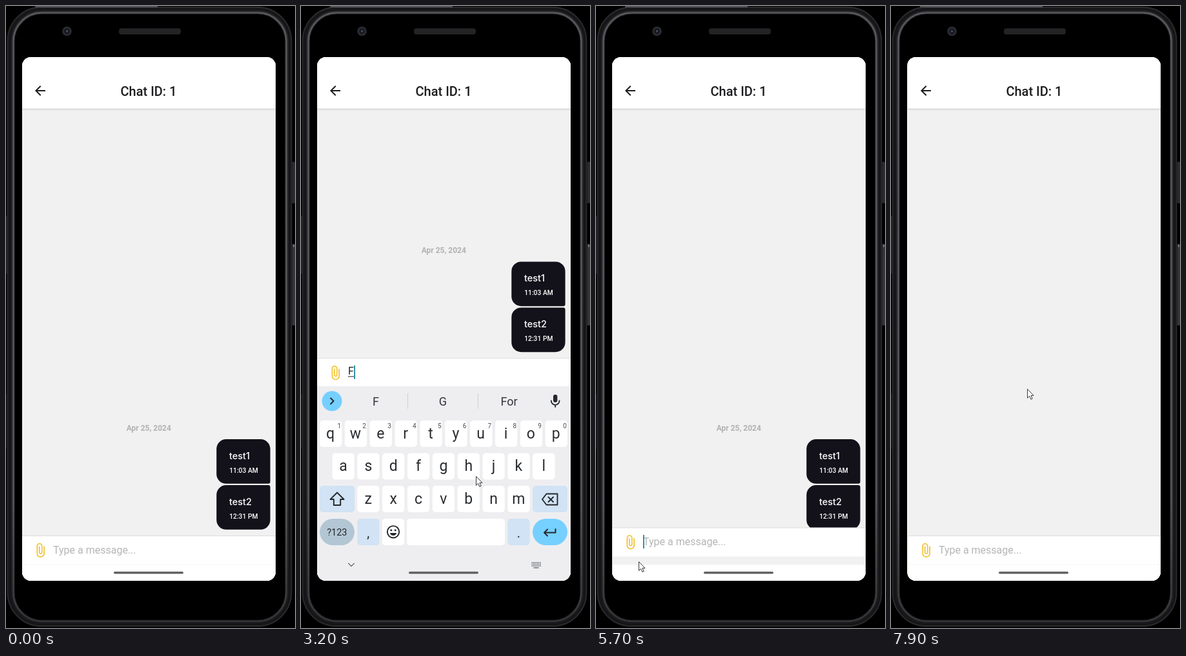
These frames come from a looping animation (448 by 962 pixels, 8000 ms). An HTML page:

```html
<!DOCTYPE html>
<html lang="en">
<head>
<meta charset="utf-8">
<title>Chat demo</title>
<style>
html, body { margin: 0; width: 100%; height: 100%; overflow: hidden; background: #000; }
svg { display: block; width: 100vw; height: 100vh; }
text { font-family: Roboto, "Noto Sans", sans-serif; }
.soft { font-family: Inter, "Open Sans", sans-serif; }
.mid { text-anchor: middle; }
.end { text-anchor: end; }
.line { fill: none; stroke: #25282b; stroke-width: 1.9; }
</style>
</head>
<body>
<svg id="stage" viewBox="0 0 448 962" xmlns="http://www.w3.org/2000/svg"></svg>
<script>
const LOOP = 8000, STEP = 100;
const YELLOW = '#f2c12e', KEY = '#d1e3f4', PRESSED = '#b3c6d4', BLUE = '#75d0ff';

const rect = (x, y, w, h, fill, r = 0, more = '') =>
  `<rect x="${x}" y="${y}" width="${w}" height="${h}" rx="${r}" fill="${fill}" ${more}/>`;
const ring = (x, y, w, h, r, stroke, width) =>
  rect(x, y, w, h, 'none', r, `stroke="${stroke}" stroke-width="${width}"`);
const text = (s, x, y, size, fill, cls = '', weight = 400, more = '') =>
  `<text x="${x}" y="${y}" font-size="${size}" fill="${fill}" class="${cls}" font-weight="${weight}" ${more}>${s}</text>`;
const path = (d, fill, more = '') => `<path d="${d}" fill="${fill}" ${more}/>`;
const stroke = (d, color, width = 1.9) =>
  path(d, 'none', `stroke="${color}" stroke-width="${width}" stroke-linecap="round" stroke-linejoin="round"`);

function phone() {
  return rect(0, 0, 448, 962, '#000') +
    rect(0, 325, 2, 89, '#252527') + rect(0, 600, 1, 85, '#19191b') +
    rect(443, 241, 5, 64, '#2b2b2d', 1) + rect(443, 368, 5, 126, '#343437', 1) +
    rect(445, 369, 2, 4, '#77777a', 1) +
    rect(1.5, 1.5, 442, 958, '#000', 53) +
    ring(6.5, 5.5, 432, 950, 49, '#161618', 9) +
    ring(2.5, 2, 440, 957, 52, '#2c2c2f', 1.8) +
    ring(11, 10, 424, 942, 45, 'url(#rim)', 5) +
    ring(11.5, 10.5, 423, 941, 44, 'url(#rimLight)', 2) +
    path('M45 1H235', 'none', 'stroke="#6b6b70" stroke-width="1.5"') +
    '<circle cx="94.5" cy="39" r="7.3" fill="#292b30"/><circle cx="94.5" cy="39" r="4.2" fill="#14171d"/><circle cx="94.5" cy="39" r="1.7" fill="#454d5d"/>' +
    rect(175, 34.5, 96, 9.5, '#232325', 4);
}

// Corner radii run clockwise from the top left.
function bubble(y, tr, br, message, time) {
  const l = 326.3, r = 409.6, b = y + 68.8, c = 15;
  const arc = (size, x, y) => `A${size} ${size} 0 0 1 ${x} ${y}`;
  return path(`M${l + c} ${y}H${r - tr}${arc(tr, r, y + tr)}V${b - br}${arc(br, r - br, b)}H${l + c}${arc(c, l, b - c)}V${y + c}${arc(c, l + c, y)}Z`, '#13121a') +
    text(message, 346, y + 31, 14.5, '#fff', 'soft', 500) +
    text(time, 346.2, y + 51.6, 10.3, '#fff', '', 500);
}

function chatScreen() {
  const clip = 'M16.5 6v11.5c0 2.21-1.79 4-4 4s-4-1.79-4-4V5c0-1.38 1.12-2.5 2.5-2.5s2.5 1.12 2.5 2.5v10.5c0 .55-.45 1-1 1s-1-.45-1-1V6H10v9.5c0 1.38 1.12 2.5 2.5 2.5s2.5-1.12 2.5-2.5V5c0-2.21-1.79-4-4-4S7 2.79 7 5v12.5c0 3.04 2.46 5.5 5.5 5.5s5.5-2.46 5.5-5.5V6h-1.5z';
  return rect(25, 79, 393, 810, '#f1f1f1') +
    `<g id="thread">${text('Apr 25, 2024', 221.3, 656.8, 12, '#b2b2b2', 'mid', 700)}` +
    bubble(670, 15, 3, 'test1', '11:03 AM') + bubble(741, 3, 15, 'test2', '12:31 PM') + '</g>' +
    rect(25, 79, 393, 79.5, '#fff', 0, 'filter="url(#shade)"') +
    path('M20 11H7.83l5.59-5.59L12 4l-8 8 8 8 1.41-1.41L7.83 13H20v-2z', '#1c1c1e', 'transform="translate(41 119)"') +
    text('Chat ID: 1', 221, 139, 20, '#1c1c1e', 'mid', 500) +
    '<g id="bar">' + rect(25, 819.5, 393, 350, '#f1f1f1') + rect(25, 819.5, 393, 44.5, '#fff') +
    rect(25, 819, 393, 1, '#dcdcdc') +
    path(clip, YELLOW, 'transform="translate(39.6 829.8) scale(1.13 1)"') +
    text('Type a message...', 73, 847, 16, '#b5b5b5', '', 400, 'id="hint"') +
    `<g id="typed">${text('F', 73, 845, 16, '#222')}${rect(73, 847.2, 9, 1, '#222')}</g>` +
    rect(73, 830.5, 1.8, 21, '#21859b', 0, 'id="caret"') +
    path('M2.01 21L23 12 2.01 3 2 10l15 2-15 2z', '#f5bf1b', 'id="send" transform="translate(372.2 828.8) scale(1.13)"') +
    '</g>' + rect(25, 864, 393, 25, '#fff') + rect(25, 863.5, 393, 1, '#f6f6f6') +
    keyboard();
}

function keyboard() {
  const pitch = 38.85;
  let s = rect(25, 588, 393, 301, '#eeeef1') +
    `<circle cx="48" cy="611" r="15.5" fill="${BLUE}"/>` + stroke('M46 606.5l4.5 4.5-4.5 4.5', '#25282b', 2);
  s += '<g id="words">' + [['F', 116], ['G', 220], ['For', 322.5]].map(([w, x]) => text(w, x, 618, 18, '#333639', 'mid')).join('') +
    rect(165, 599, 1, 24, '#cfcfd3') + rect(274, 599, 1, 24, '#cfcfd3') + '</g>';
  s += rect(391, 601, 6.4, 12, '#25282b', 3.2) + stroke('M387.8 610.5a6.4 6.4 0 0 0 12.8 0M394.2 617v3', '#25282b');
  [['qwertyuiop', 29, 641], ['asdfghjkl', 48.4, 691.5], ['zxcvbnm', 87.2, 742]].forEach(([row, x0, y], r) => {
    [...row].forEach((c, i) => {
      const x = x0 + i * pitch;
      s += rect(x, y, 34.3, 41, '#fff', 5) +
        text(c, x + (r ? 17.1 : 16.6), y + 27.8, 23, '#2a2d30', 'mid letter');
      if (!r) s += text((i + 1) % 10, x + 30.3, y + 11.5, 10, '#4a4d50', 'mid');
    });
  });
  s += rect(29, 742, 54, 41, KEY, 5) +
    path('M56 752.5l10.5 10.5h-5.3v9h-10.4v-9h-5.3z', 'none', 'id="shift" stroke="#25282b" stroke-width="1.9" stroke-linejoin="round"') +
    rect(359, 742, 54, 41, KEY, 5, 'id="erase"') +
    stroke('M380.5 754.5h17v17h-17l-6.5-8.5zM383.5 759.5l7.5 7.5m0-7.5l-7.5 7.5', '#25282b') +
    rect(29, 793, 54, 41, PRESSED, 20.5) + text('?123', 55.8, 819, 14.5, '#25282b', 'mid') +
    rect(87.2, 793, 34.3, 41, KEY, 5) + text(',', 104.3, 822, 20, '#25282b', 'mid') +
    rect(126, 793, 34.3, 41, '#fff', 5) +
    '<circle class="line" cx="143" cy="813.3" r="9.2"/><circle cx="139.8" cy="810.8" r="1.5" fill="#25282b"/><circle cx="146.2" cy="810.8" r="1.5" fill="#25282b"/>' +
    path('M137.8 815h10.4a5.4 5.4 0 0 1-10.4 0z', '#25282b') +
    rect(164, 793, 152, 41, '#fff', 5) +
    rect(320.3, 793, 34.3, 41, KEY, 5) + text('.', 337.5, 822, 20, '#25282b', 'mid') +
    rect(359, 793, 54, 41, BLUE, 20.5) +
    stroke('M394.5 809v5.5h-17M382 809.5l-5 5 5 5', '#25282b', 2) +
    stroke('M73.5 862l4.5 4.5 4.5-4.5', '#6b6e72', 1.3);
  for (let i = 0; i < 18; i++) s += rect(357.5 + i % 6 * 2.5, 860 + Math.floor(i / 6) * 2.6, 1.7, 1.7, '#777a7e');
  s += rect(360.5, 868, 8, 1.6, '#777a7e');
  return `<g id="keys">${s}</g>`;
}

function row(y, id, last, date) {
  return `<g transform="translate(0 ${y})"><circle cx="64" cy="0" r="20" fill="#999"/>` +
    path('M64-13.5c-6 0-9.2 4.2-9.2 9.5 0 4.4 1.8 7.4 4.2 9.5-.3 3-1.6 3.7-8 6.5a18 18 0 0 0 26 0c-6.4-2.8-7.7-3.5-8-6.5 2.4-2.1 4.2-5.1 4.2-9.5 0-5.3-3.2-9.5-9.2-9.5z', '#fff') +
    text('Receiver id: ' + id, 94.5, -3, 14.5, '#2b2b2b', 'soft') +
    text(last, 94.5, 15.5, 12, '#444', 'soft') +
    text(date, 397.7, -4.2, 11.8, '#444', 'soft end') +
    rect(25, 41, 393, 1, '#eee') + '</g>';
}

function listScreen() {
  const gray = '#c9c9c9';
  const tab = (s, x, color) => text(s, x, 862, 10.8, color, 'soft mid', 500);
  return rect(25, 79, 393, 810, '#fff') +
    rect(25, 159, 393, 48.5, '#fff', 0, 'filter="url(#shade)"') +
    rect(25, 79, 393, 79.5, '#fff', 0, 'filter="url(#shade)"') +
    text('Messages', 221, 139, 20, '#1c1c1e', 'mid', 500) +
    text('All', 89.5, 190, 17, '#d0d0d0', 'soft mid', 500) +
    text('Sender', 220.7, 190, 17, '#2b2b2b', 'soft mid') +
    text('Expeditor', 352, 190, 17, '#d0d0d0', 'soft mid', 500) +
    rect(155, 206, 132, 2.6, YELLOW) +
    row(247, 453, 'O', '3/28/2024') + row(328.5, 1, 'test2', '4/25/2024') +
    rect(25, 818, 393, 2, '#f1f1f1') +
    ring(81.8, 828, 16.6, 20, 3, gray, 2) + stroke('M86 833.5h8.4M86 838h8.4M86 842.5h5', gray, 1.8) +
    stroke('M214.5 829.5h14a2.5 2.5 0 0 1 2.5 2.5v9a2.5 2.5 0 0 1-2.5 2.5h-4l-3 3.5-3-3.5h-4a2.5 2.5 0 0 1-2.5-2.5v-9a2.5 2.5 0 0 1 2.5-2.5zM217 834.5h9M217 838.8h6', YELLOW, 2) +
    `<circle cx="352" cy="832.8" r="4.4" fill="none" stroke="${gray}" stroke-width="2"/>` +
    stroke('M343.8 847.5v-1.5a4.5 4.5 0 0 1 4.5-4.5h7.4a4.5 4.5 0 0 1 4.5 4.5v1.5z', gray, 2) +
    tab('Orders', 90.3, gray) + tab('Messages', 221.5, YELLOW) + tab('Account', 352.3, gray);
}

const fade = (id, top, bottom) =>
  `<linearGradient id="${id}" x1="0" y1="0" x2="0" y2="1"><stop offset="0" stop-color="${top}"/><stop offset=".8" stop-color="${top}"/><stop offset="1" stop-color="${bottom}"/></linearGradient>`;

document.getElementById('stage').innerHTML =
  `<defs>${fade('rim', '#2f2f32', '#1d1d1f')}${fade('rimLight', '#5c5c61', '#38383b')}
  <clipPath id="screen">${rect(25, 79, 393, 810, '#fff', 14)}</clipPath>
  <filter id="shade" x="-5%" y="-10%" width="110%" height="130%"><feDropShadow dx="0" dy="1" stdDeviation="1.6" flood-opacity=".22"/></filter></defs>` +
  phone() + `<g clip-path="url(#screen)">${rect(25, 79, 393, 810, '#fff')}<g id="list">${listScreen()}</g><g id="chat">${chatScreen()}</g>` +
  rect(167, 874.7, 108, 3.6, '#626264', 1.8) + '</g>' +
  path('M.5.5V14.3L3.7 11.3 5.9 16.3 8.2 15.3 6 10.4H10Z', '#fff', 'id="pointer" stroke="#222" stroke-width=".9"');

const $ = id => document.getElementById(id);
const letters = [...document.querySelectorAll('.letter')];
const show = (id, on) => $(id).setAttribute('display', on ? 'inline' : 'none');
const shift = (id, x, y) => $(id).setAttribute('transform', `translate(${x} ${y})`);
const clamp = v => Math.min(1, Math.max(0, v));
const ramp = (t, from, to) => clamp((t - from) / (to - from));
const smooth = p => p * p * (3 - 2 * p);
const settle = p => 1 - Math.pow(1 - p, 2.5);

// Pointer stops: time, x, y
const stops = [
  [200, 395, 657], [900, 72, 836], [1300, 72, 836], [1500, 150, 658], [1700, 242, 745],
  [1900, 174, 861], [2100, 150, 842], [2400, 150, 842], [2900, 176, 716], [3100, 182, 712],
  [3200, 271, 727], [4000, 392, 775], [4400, 395, 772], [4600, 395, 772], [4900, 180, 831],
  [5100, 78, 862], [5400, 76, 862], [5700, 66, 859], [5900, 64, 850], [6400, 50, 130],
  [6600, 50, 130], [7000, 204, 354], [7200, 206, 345], [7500, 206, 345], [7900, 211, 592]
];

function pointerAt(t) {
  const i = stops.findIndex(s => s[0] > t);
  if (i < 0) return stops[stops.length - 1].slice(1);
  const a = stops[Math.max(0, i - 1)], b = stops[i], p = smooth(ramp(t, a[0], b[0]));
  return [a[1] + (b[1] - a[1]) * p, a[2] + (b[2] - a[2]) * p];
}

function render(t) {
  const raised = 274.6, slide = 39.3;
  const opening = smooth(ramp(t, 2350, 2750));
  const barUp = t < 5000 ? opening : 1 - settle(ramp(t, 5400, 5823));
  const keysUp = t < 5000 ? opening : 1 - smooth(ramp(t, 5350, 5650));
  const hasText = t >= 3200 && t < 4500;

  shift('bar', 0, -raised * barUp);
  shift('thread', 0, t < 5000 ? -raised * opening : t < 5500 ? -raised : 0);
  shift('keys', 0, 301 * (1 - keysUp));
  show('keys', keysUp > 0);
  show('thread', t < 7500);
  show('typed', hasText);
  show('words', hasText);
  show('hint', !hasText);
  show('send', t >= 3300 && t < 4500);
  show('caret', t >= 2300 && t < 5900);
  $('caret').setAttribute('x', hasText ? 82.2 : 73);
  $('erase').setAttribute('fill', t >= 4300 && t < 4500 ? PRESSED : KEY);
  $('shift').setAttribute('fill', hasText ? 'none' : '#25282b');
  for (const l of letters) l.textContent = hasText ? l.textContent.toLowerCase() : l.textContent.toUpperCase();

  // The chat leaves to the right, then comes back in from there.
  const leave = settle(ramp(t, 6600, 7050)), enter = settle(ramp(t, 7550, 8000));
  const away = t < 7550 ? leave : 1 - enter;
  const alpha = t < 7550 ? 1 - ramp(t, 6635, 6718) : ramp(t, 7600, 7683);
  shift('chat', slide * away, 0);
  shift('list', -slide * (1 - away), 0);
  $('chat').setAttribute('opacity', alpha);
  show('list', alpha < 1);

  shift('pointer', ...pointerAt(t));
  show('pointer', t >= 200);
}

function frame() {
  render(Math.floor(performance.now() % LOOP / STEP) * STEP);
  requestAnimationFrame(frame);
}
frame();
</script>
</body>
</html>
```
